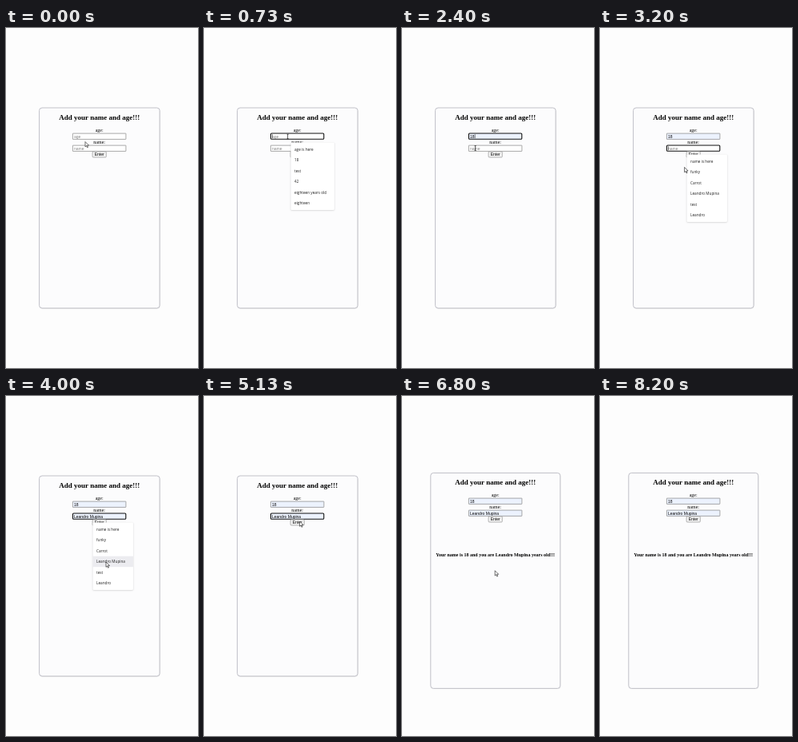
Recreate the animation shown at these times as an HTML page with a canvas. Size 240 by 426 pixels, loop 8270 ms.

```html
<!DOCTYPE html>
<html lang="en">
<head>
<meta charset="utf-8">
<title>Name and age form</title>
<style>
html, body { margin: 0; width: 100%; height: 100%; overflow: hidden; background: #fdfdfd; }
canvas { display: block; width: 240px; height: 426px; }
</style>
</head>
<body>
<canvas id="stage"></canvas>
<script>
const W = 240, H = 426, LOOP = 8270, STEP = 200 / 3, MID = 116.7;
const SERIF = '"Liberation Serif", "Times New Roman", serif';
const SANS = '"Liberation Sans", Arial, sans-serif';
const MENU = '"Open Sans", "Noto Sans", sans-serif';

const canvas = document.getElementById('stage');
const ctx = canvas.getContext('2d');
const dpr = window.devicePixelRatio || 1;
canvas.width = W * dpr;
canvas.height = H * dpr;

const AGE = '18', NAME = 'Leandro Mupina';
const ageMenu = {
  x: 108.5, y: 143.5, w: 54.5, open: 600, close: 1930,
  items: ['age is here', AGE, 'test', '42', 'eighteen years old', 'eighteen']
};
const nameMenu = {
  x: 108.5, y: 158.5, w: 50.5, open: 2670, close: 4330,
  items: ['name is here', 'funky', 'Carrot', NAME, 'test', 'Leandro']
};
const SUBMIT = 5330, ROW = 13.5, PAD = 1.7;

// time, x, y of the pointer tip
const path = [
  [0, 99, 142.5], [200, 99, 142.5], [480, 104, 136], [760, 105, 136],
  [1300, 123, 164], [1950, 123, 164], [2330, 91.7, 150.5], [2800, 91.7, 150.5],
  [3700, 125, 208], [4400, 125, 208], [5000, 119.6, 157], [5450, 119.6, 157],
  [6200, 116.2, 218.8], [7100, 116.2, 218.8], [7650, 150, 440], [LOOP, 150, 440]
];

function pointer(t) {
  let i = 0;
  while (i < path.length - 2 && t >= path[i + 1][0]) i++;
  const [t0, x0, y0] = path[i], [t1, x1, y1] = path[i + 1];
  const u = (t - t0) / (t1 - t0), e = u * u * (3 - 2 * u);
  return { x: x0 + (x1 - x0) * e, y: y0 + (y1 - y0) * e };
}

function text(s, x, y, font, color = '#000', align = 'left') {
  ctx.font = font;
  ctx.fillStyle = color;
  ctx.textAlign = align;
  ctx.fillText(s, x, y);
}

function box(x, y, w, h, r, fill, stroke, line = 0.75) {
  ctx.beginPath();
  ctx.roundRect(x, y, w, h, r);
  ctx.fillStyle = fill;
  ctx.fill();
  if (stroke) {
    ctx.strokeStyle = stroke;
    ctx.lineWidth = line;
    ctx.stroke();
  }
}

function shadow(color, blur, dx, dy) {
  ctx.shadowColor = color;
  ctx.shadowBlur = blur * dpr;
  ctx.shadowOffsetX = dx * dpr;
  ctx.shadowOffsetY = dy * dpr;
}

function card(done) {
  const [x, y, w, h] = done ? [35.8, 96.4, 162, 270] : [41.6, 100, 150.5, 251];
  ctx.save();
  shadow('rgba(0,0,0,.15)', 1, 0.3, 0.4);
  box(x, y, w, h, 3.5, '#fcfcfd');
  ctx.restore();
  box(x, y, w, h, 3.5, '#fcfcfd', '#aaaab4', 0.7);
}

function field(y, value, hint, focus, filled, caret) {
  const fill = filled ? '#ecf2fe' : '#fff';
  if (focus) box(83.5, y, 66.3, 7.2, 1, fill, '#101010', 1.1);
  else box(83.4, y + 0.1, 66.5, 7.3, 0.3, fill, '#858585', 0.7);
  text(value || hint, 85, y + 5.6, `5px ${SANS}`, value ? '#000' : '#858585');
  if (caret) {
    const x = 85.3 + (value ? ctx.measureText(value).width : 0);
    ctx.fillStyle = '#000';
    ctx.fillRect(x, y + 1.2, 0.5, 5);
  }
}

function hovered(menu, t, p) {
  if (t < menu.open || t >= menu.close || p.x < menu.x) return -1;
  const i = Math.floor((p.y - menu.y - PAD) / ROW);
  return i >= 0 && i < menu.items.length ? i : -1;
}

function dropdown(menu, row) {
  const h = menu.items.length * ROW + PAD * 2;
  ctx.save();
  shadow('rgba(0,0,0,.2)', 2, 0, 0.5);
  box(menu.x, menu.y, menu.w, h, 1.2, '#fff');
  ctx.restore();
  menu.items.forEach((s, i) => {
    const y = menu.y + PAD + i * ROW;
    if (i === row) {
      ctx.fillStyle = '#ececf0';
      ctx.fillRect(menu.x, y, menu.w, ROW);
    }
    text(s, 113, y + 8.4, `4.7px ${MENU}`, '#222');
  });
}

function arrow(x, y) {
  ctx.save();
  ctx.translate(x, y);
  ctx.beginPath();
  [[0, 0], [0, 6.3], [1.5, 5], [2.5, 7.3], [3.5, 6.9], [2.5, 4.6], [4.5, 4.5]]
    .forEach(q => ctx.lineTo(...q));
  ctx.closePath();
  ctx.fillStyle = '#fff';
  ctx.fill();
  ctx.strokeStyle = '#111';
  ctx.lineWidth = 0.6;
  ctx.stroke();
  ctx.restore();
}

function beam(x, y) {
  ctx.fillStyle = '#111';
  ctx.fillRect(x - 0.35, y - 3, 0.7, 6);
  ctx.fillRect(x - 1.3, y - 3.2, 2.6, 0.5);
  ctx.fillRect(x - 1.3, y + 2.7, 2.6, 0.5);
}

function inField(p, y) {
  return p.x > 83 && p.x < 150 && p.y > y && p.y < y + 7.8;
}

function draw(t) {
  const p = pointer(t), done = t >= SUBMIT, dy = done ? -4 : 0;
  const ageRow = hovered(ageMenu, t, p), nameRow = hovered(nameMenu, t, p);
  const ageSet = t >= ageMenu.close, nameSet = t >= nameMenu.close;
  const ageFocus = t >= ageMenu.open && t < nameMenu.open;
  const nameFocus = t >= nameMenu.open && !done;
  const age = ageSet ? AGE : ageMenu.items[ageRow] || '';
  const name = nameSet ? NAME : nameMenu.items[nameRow] || '';
  const ageY = 132 + dy, nameY = 147 + dy;

  ctx.setTransform(dpr, 0, 0, dpr, 0, 0);
  ctx.fillStyle = '#fdfdfd';
  ctx.fillRect(0, 0, W, H);
  card(done);
  text('Add your name and age!!!', MID, 115.3 + dy, `bold 9px ${SERIF}`, '#000', 'center');
  text('age:', MID, 130.4 + dy, `6px ${SERIF}`, '#000', 'center');
  field(ageY, age, 'age', ageFocus, age, ageFocus && (ageSet || !age));
  text('name:', MID, 145.2 + dy, `6px ${SERIF}`, '#000', 'center');
  field(nameY, name, 'name', nameFocus, name, nameFocus && !name);
  box(108.1, 154.8 + dy, 17.2, 7.2, 1, '#f3f3f3', '#858585', 0.6);
  text('Enter', MID, 160.2 + dy, `5px ${SANS}`, '#000', 'center');
  if (done) {
    text(`Your name is ${AGE} and you are ${NAME} years old!!!`, MID, 201,
      `bold 6px ${SERIF}`, '#000', 'center');
  }

  for (const [menu, row] of [[ageMenu, ageRow], [nameMenu, nameRow]]) {
    if (t >= menu.open && t < menu.close) dropdown(menu, row);
  }

  const overMenu = ageRow >= 0 || nameRow >= 0;
  if (!overMenu && (inField(p, ageY) || inField(p, nameY))) beam(p.x, p.y);
  else arrow(p.x, p.y);
}

function tick(now) {
  const t = now % LOOP;
  draw(Math.floor(t / STEP + 0.001) * STEP);
  requestAnimationFrame(tick);
}
draw(0);
requestAnimationFrame(tick);
</script>
</body>
</html>
```
